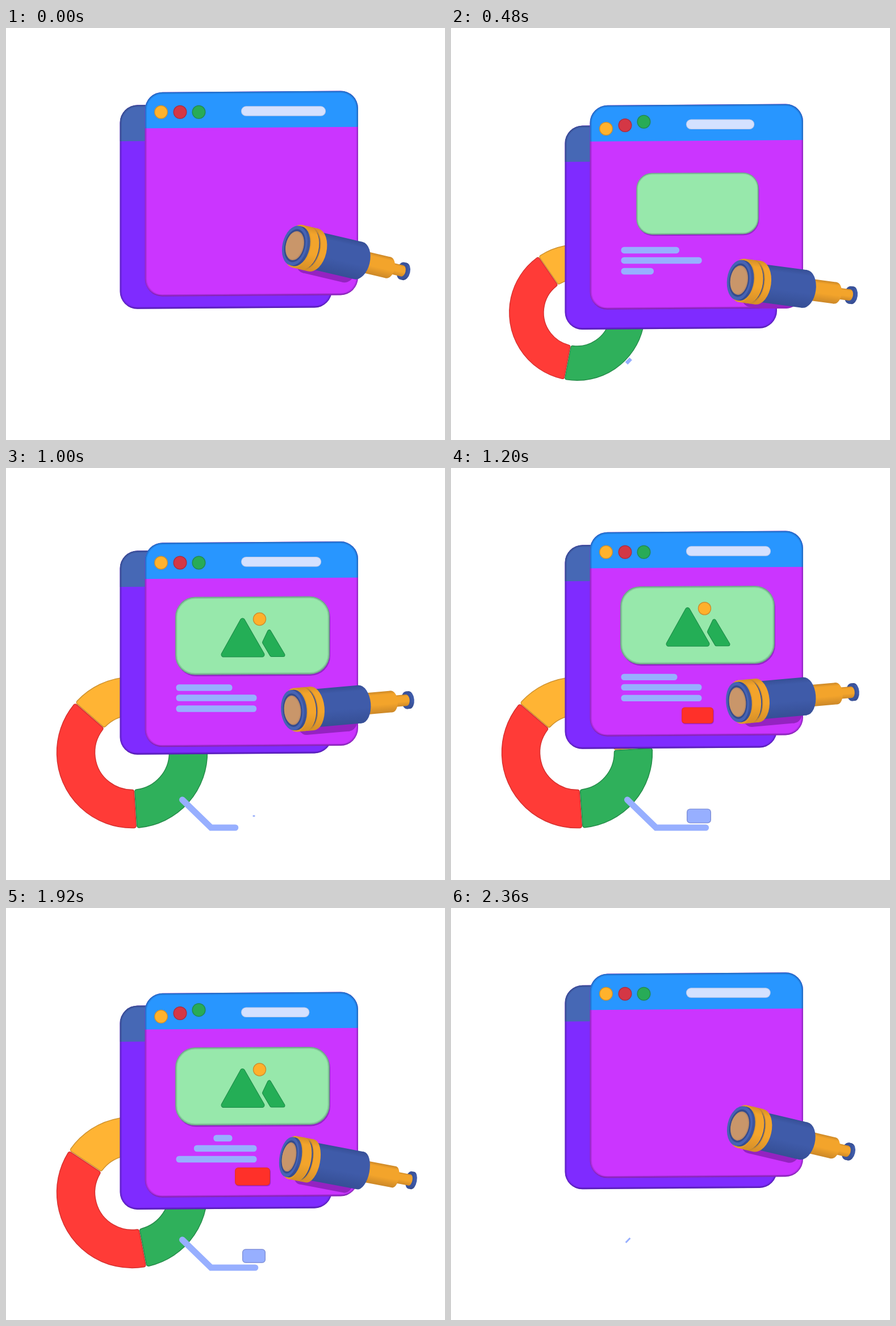
Write an HTML page with a canvas that moves like this. It is 773 px wide and 724 px high and loops after 2.4 s.

```html
<!DOCTYPE html>
<html>
<head>
<meta charset="utf-8">
<style>
html, body { margin: 0; width: 100%; height: 100%; overflow: hidden; background: #fff; }
canvas { display: block; }
</style>
</head>
<body>
<canvas width="773" height="724"></canvas>
<script>
const ctx = document.querySelector('canvas').getContext('2d');
const LOOP = 2400, TAU = Math.PI * 2, RAD = Math.PI / 180;
const BLUE = '#3f5ba9', YELLOW = '#f3a42b', PALE = '#97afff', GREEN = '#24ae56';

const mix = (a, b, p) => a + (b - a) * p;
const wave = t => 1 - Math.cos(TAU * t / 1200);
const frontLift = t => 16.5 - 20.5 * Math.cos(TAU * (t - 120) / 1200);

// Eased value through time, value pairs
function keys(t, ...k) {
  if (t <= k[0]) return k[1];
  for (let i = 2; i < k.length; i += 2) {
    if (t < k[i]) {
      const p = (t - k[i - 2]) / (k[i] - k[i - 2]);
      return mix(k[i - 1], k[i + 1], p * p * (3 - 2 * p));
    }
  }
  return k[k.length - 1];
}

function group(draw) {
  ctx.save();
  draw();
  ctx.restore();
}

function scaled(x, y, s, draw) {
  if (s > 0.01) group(() => {
    ctx.translate(x, y);
    ctx.scale(s, s);
    ctx.translate(-x, -y);
    draw();
  });
}

function box(x, y, w, h, r, color) {
  if (w <= 0.5) return;
  ctx.beginPath();
  ctx.roundRect(x, y, w, h, Math.min(r, w / 2));
  ctx.fillStyle = color;
  ctx.fill();
}

// Dark inner edge along the current path
function bevel(...widths) {
  ctx.clip();
  ctx.strokeStyle = 'rgba(20,10,60,.12)';
  for (ctx.lineWidth of widths) ctx.stroke();
}

function slab(x, y, w, h, r, color, ...widths) {
  group(() => {
    box(x, y, w, h, r, color);
    bevel(...widths);
  });
}

function dot(x, y, r, color) {
  group(() => {
    ctx.beginPath();
    ctx.arc(x, y, r, 0, TAU);
    ctx.fillStyle = color;
    ctx.fill();
    bevel(2, 3);
  });
}

function windowFrame(x, y, w, h, headColor, bodyColor) {
  group(() => {
    ctx.transform(1, -0.007, 0, 1, 0, x * 0.007);
    group(() => {
      box(x, y, w, h, 31, bodyColor);
      ctx.clip();
      ctx.fillStyle = headColor;
      ctx.fillRect(x, y, w, 63.5);
    });
    ctx.beginPath();
    ctx.roundRect(x, y, w, h, 31);
    bevel(2, 4, 7);
    // Darker lower edge
    ctx.translate(0, -1.5);
    ctx.beginPath();
    ctx.roundRect(x - 3, y - 9, w + 6, h + 9, 31);
    ctx.lineWidth = 3;
    ctx.stroke();
  });
}

function sector(from, to, color, rim) {
  const inset = 4.3, outer = 129, inner = 69;
  ctx.beginPath();
  ctx.arc(0, 0, outer, -to * RAD + inset / outer, -from * RAD - inset / outer);
  ctx.arc(0, 0, inner, -from * RAD - inset / inner, -to * RAD + inset / inner, true);
  ctx.closePath();
  ctx.lineJoin = 'round';
  for (const [width, tone] of [[8.5, rim], [5.5, color]]) {
    ctx.lineWidth = width;
    ctx.strokeStyle = tone;
    ctx.stroke();
  }
  ctx.fillStyle = color;
  ctx.fill();
}

function donut(t) {
  const size = keys(t, 160, 0, 320, 1.15, 480, 0.9, 600, 1, 1940, 1, 2080, 1.13, 2230, 0);
  const turn = -15.2 * Math.exp((480 - t) / 177) + 6.6 * Math.max(0, (t - 1680) / 240) ** 3;
  if (size > 0.01) group(() => {
    ctx.translate(222, 500);
    ctx.scale(size, size);
    ctx.rotate(-turn * RAD);
    sector(4, 139.7, '#ffb434', '#cf9230');
    sector(139.7, 274.3, '#ff3b37', '#d6302f');
    sector(274.3, 364, '#2fb05b', '#268c4a');
  });
}

function callout(t) {
  const drawn = Math.max(0, (t - 440) / 760) ** 1.1;
  const length = Math.min(158, 158 * drawn, 0.33 * (2370 - t));
  if (length > 0) group(() => {
    ctx.beginPath();
    ctx.moveTo(310.5, 583);
    ctx.lineTo(361, 632);
    ctx.lineTo(449, 632);
    ctx.setLineDash([length, 999]);
    ctx.lineWidth = 11;
    ctx.lineCap = length < 12 ? 'butt' : 'round';
    ctx.strokeStyle = PALE;
    ctx.stroke();
  });
  const size = keys(t, 960, 0, 1180, 1.23, 1400, 1, 1780, 1, 1930, 1.17, 2100, 0);
  scaled(436.5, 611.5, size, () => slab(419, 601, 35, 21, 5, PALE, 2, 2));
}

function peak(width, ...points) {
  ctx.beginPath();
  for (let i = 0; i < points.length; i += 2) ctx.lineTo(points[i], points[i + 1]);
  ctx.closePath();
  ctx.lineJoin = 'round';
  for (const [w, tone] of [[width, '#1d8a48'], [width - 2, GREEN]]) {
    ctx.lineWidth = w;
    ctx.strokeStyle = tone;
    ctx.stroke();
  }
  ctx.fillStyle = GREEN;
  ctx.fill();
}

function page(t) {
  // Header
  const tilt = keys(t % 1200, 400, 0, 600, 17, 800, 0);
  dot(273, 148 + tilt, 12, '#ffb22c');
  dot(306.5, 148, 12, '#d43745');
  dot(339.5, 148 - tilt, 12, '#28ab57');
  slab(414, 137.5, 149 - 15.9 * wave(t), 17.5, 8.7, '#d4e1ff', 2);

  // Picture panel
  const panel = keys(t, 320, 0, 548, 1, 2010, 1, 2200, 0);
  scaled(434, 322, panel, () => group(() => {
    ctx.transform(1, -0.005, 0, 1, 0, 2.2);
    box(300, 210, 271, 137, 35, 'rgba(70,10,120,.4)');
    slab(298, 207.5, 272, 137, 35, '#97e8ab', 2, 4, 7);
  }));
  const scene = keys(t, 540, 0, 740, 1, 1930, 1, 2090, 0);
  scaled(435, 290, scene, () => {
    ctx.translate(0, keys(t, 560, -20, 900, 0));
    peak(9, 416.5, 249.5, 383, 309.5, 451, 309.5);
    peak(7, 463.5, 269, 454.5, 288, 467.5, 310, 488, 310);
    dot(446.5, 247, 11.7, '#ffb02b');
  });

  // Text lines grow from the left and leave to the right
  [[99, 367.5, 320], [142, 385.5, 326], [142, 404.5, 401]].forEach(([w, y, start], i) => {
    const grown = w * keys(t - start, 0, 0, 200, 1.15, 500, 0.965, 620, 1);
    const gone = w * keys(t - 1762 - 80 * i, 0, 0, 260, 1);
    box(299.5 + gone, y - 5.7, grown - gone, 11.4, 5.2, PALE);
  });

  scaled(434, 435, keys(t, 1020, 0, 1245, 1, 1960, 1, 2140, 0), () => {
    box(404, 420.5, 62, 31.5, 6, 'rgba(90,10,140,.4)');
    slab(403, 419, 62, 31.5, 6, '#ff3029', 2);
  });
}

function telescope(t) {
  const pose = (a, b, c) => keys(t, 400, a, 620, b, 1240, b, 1500, c, 1960, c, 2230, a);
  const x = pose(508.5, 504.5, 498.5);
  const y = pose(382.5, 411.5, 386) + 28.5 * wave(t);
  const angle = pose(13.2, -5, 10.8) * RAD;
  const yaw = pose(0.61, 0.57, 0.47);
  const depth = Math.sqrt(1 - yaw * yaw);

  const disc = (z, r, color) => {
    ctx.beginPath();
    ctx.ellipse(z * depth, 0, r * yaw, r, 0, 0, TAU);
    ctx.fillStyle = color;
    ctx.fill();
  };
  const tube = (from, to, r, light, dark, cap) => {
    const shade = ctx.createLinearGradient(0, -r, 0, r);
    shade.addColorStop(0, dark);
    shade.addColorStop(0.15, light);
    shade.addColorStop(0.6, light);
    shade.addColorStop(1, dark);
    disc(to, r, shade);
    ctx.fillRect(from * depth, -r, (to - from) * depth, 2 * r);
    disc(from, r, cap || shade);
  };
  const place = (dx, dy) => {
    ctx.translate(x + dx, y + dy);
    ctx.rotate(angle);
  };

  group(() => {
    ctx.beginPath();
    ctx.roundRect(245, 111 + frontLift(t), 375, 359, 31);
    ctx.clip();
    place(6, 12);
    tube(20, 112, 33, '#9423c1', '#9423c1');
  });
  group(() => {
    place(0, 0);
    tube(245, 251, 15.5, BLUE, '#33498c', '#3a539b');
    tube(205, 245, 10, YELLOW, '#d08a27');
    tube(140, 213, 19, YELLOW, '#cc8828');
    tube(38, 145, 33.5, BLUE, '#364f96');
    tube(28, 42, 38.5, YELLOW, '#d58f28', '#c98a2c');
    tube(24, 28, 36, '#3c5092', '#34467f');
    tube(6, 24, 38.5, YELLOW, '#d58f28', '#e29a2b');
    tube(0, 6, 35.5, '#3c569f', '#33498c', '#4663b4');
    disc(0, 29.5, '#344b8d');
    disc(0, 26, '#b98a68');
    disc(-1, 24, '#c9966a');
  });
}

function frame() {
  const t = performance.now() % LOOP;
  ctx.clearRect(0, 0, 773, 724);
  donut(t);
  callout(t);
  group(() => {
    ctx.translate(0, 20 * wave(t));
    windowFrame(200.5, 135.5, 373.5, 358.5, '#4668b5', '#7f2bff');
  });
  group(() => {
    ctx.translate(0, frontLift(t));
    windowFrame(244.5, 113, 375.5, 359, '#2896ff', '#cb35ff');
    page(t);
  });
  telescope(t);
  requestAnimationFrame(frame);
}
frame();
</script>
</body>
</html>
```
